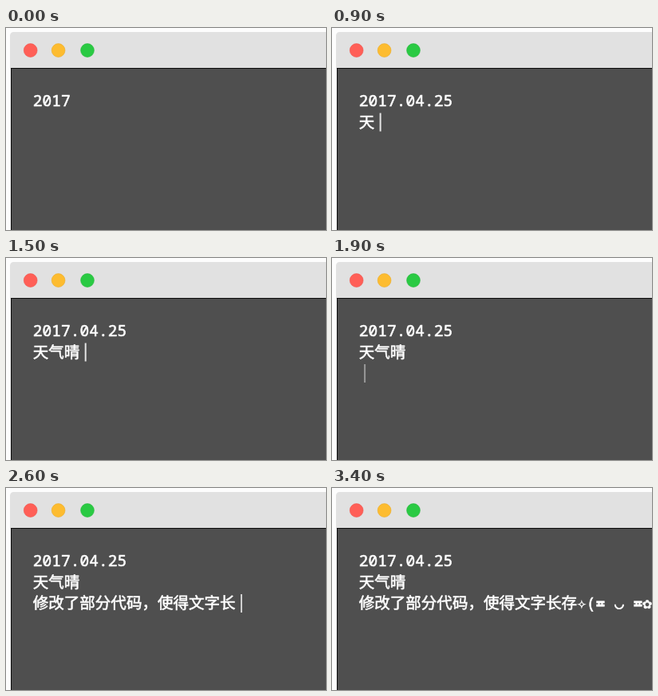
Write an HTML page that moves like this. It is 401x253 px and loops after 3.6 s.

```html
<!DOCTYPE html>
<html lang="zh-CN">
<head>
<meta charset="utf-8">
<title>Typing terminal</title>
<style>
  html, body { margin: 0; width: 100%; height: 100%; overflow: hidden; background: #fdfdfd; }
  svg { display: block; width: 401px; height: 253px; }
  text { fill: #fff; stroke: #fff; stroke-width: .6px; font-size: 19.5px; white-space: pre; }
  .half { font-family: "Noto Sans Mono", "DejaVu Sans Mono", monospace; }
  .sign { font-family: "DejaVu Sans Mono", "DejaVu Sans", monospace; font-weight: 700; stroke-width: .4px; }
  .full { font-family: "Noto Sans CJK SC", "Noto Sans CJK", sans-serif; }
  circle { stroke-width: .6px; }
</style>
</head>
<body>
<svg viewBox="0 0 401 253" lang="zh-CN">
  <path d="M5 51V10Q5 5 10 5H402V51Z" fill="#e1e1e1"/>
  <rect x="6" y="50" width="396" height="204" fill="#0c0c0c"/>
  <rect x="7" y="51" width="395" height="203" fill="#4f4f4f"/>
  <circle cx="30.7" cy="28" r="8.4" fill="#ff5f57" stroke="#ec5650"/>
  <circle cx="65.6" cy="28" r="8.4" fill="#fdbc30" stroke="#e9ac2c"/>
  <circle cx="102" cy="28" r="8.4" fill="#2aca43" stroke="#25b73b"/>
  <g id="lines"></g>
  <rect id="cursor" width="2" height="23" fill="#e4e4e4"/>
</svg>
<script>
const LOOP = 3600, TICK = 100, LEFT = 33.7, FULL = 19.53, HALF = 11.75;
const lines = [
  { text: "2017.04.25", y: 97.5, start: -200 },
  { text: "天气晴", y: 124.5, start: 850 },
  { text: "修改了部分代码，使得文字长存✧(≖ ◡ ≖✿", y: 151, start: 1950 }
];
const newlines = [700, 1700];   // when the cursor drops to the next line
const rate = 2 / TICK;          // typed characters per ms
const blink = 600;

const group = document.getElementById("lines");
const cursor = document.getElementById("cursor");

function kind(ch) {
  if (/[✧≖◡✿]/.test(ch)) return "sign";
  return ch.charCodeAt(0) > 0x2fff ? "full" : "half";
}

for (const line of lines) {
  let x = LEFT;
  line.stops = [x];
  line.glyphs = [...line.text].map(ch => {
    const el = document.createElementNS("http://www.w3.org/2000/svg", "text");
    const type = kind(ch);
    el.setAttribute("class", type);
    el.setAttribute("x", x);
    el.setAttribute("y", line.y);
    el.textContent = ch;
    group.append(el);
    x += type === "full" ? FULL : HALF;
    line.stops.push(x);
    return el;
  });
}

function typed(line, t) {
  const n = Math.round((t - line.start) * rate);
  return Math.max(0, Math.min(line.glyphs.length, n));
}

const glow = t => Math.sin(Math.PI * (t % blink) / blink);

function draw(now) {
  const t = Math.floor((now % LOOP) / TICK) * TICK;
  for (const line of lines) {
    const n = typed(line, t);
    line.glyphs.forEach((el, i) => el.style.display = i < n ? "" : "none");
  }
  const row = newlines.filter(at => t >= at).length;
  const line = lines[row];
  cursor.setAttribute("x", line.stops[typed(line, t)] + 6.4);
  cursor.setAttribute("y", line.y - 18);
  cursor.setAttribute("opacity", glow(t));
}

const begin = performance.now();
function frame() {
  draw(performance.now() - begin);
  requestAnimationFrame(frame);
}
frame();
</script>
</body>
</html>
```
